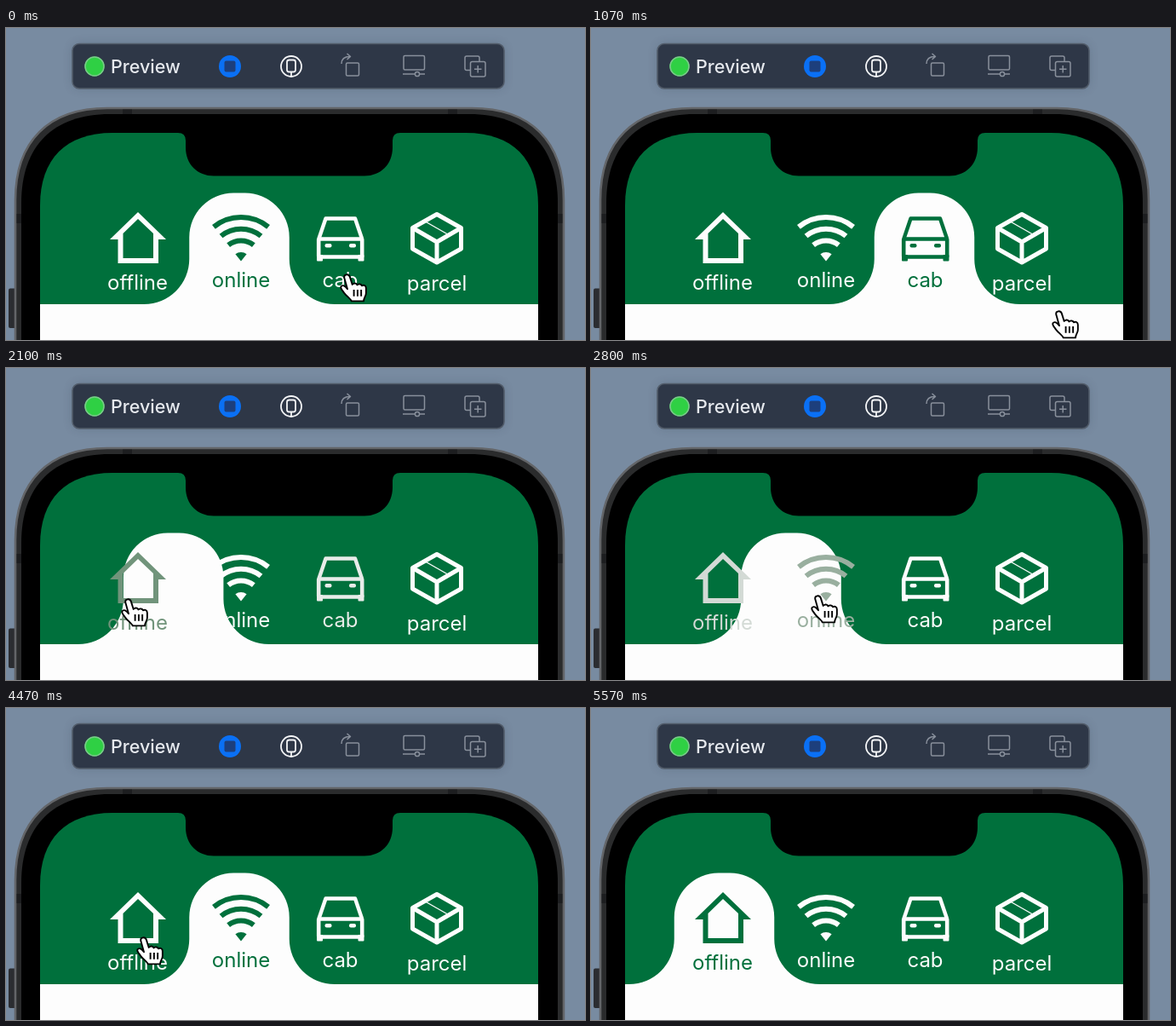
An HTML page with a canvas for the animation above (5.61 s loop, 680 px wide and 366 px high).

```html
<!DOCTYPE html>
<html lang="en">
<head>
<meta charset="utf-8">
<title>Tab bar preview</title>
<style>
html, body { margin: 0; width: 100%; height: 100%; overflow: hidden; background: #788ba1; }
canvas { display: block; width: 680px; height: 366px; }
</style>
</head>
<body>
<canvas id="stage"></canvas>
<script>
const LOOP = 5610, SLIDE = 350;
const GREEN = [0, 112, 60], WHITE = [253, 253, 253];
const FONT = 'Inter, Roboto, sans-serif';
const FIRST_X = 156.5, STEP = 117.5;

const canvas = document.getElementById('stage');
const ctx = canvas.getContext('2d');
const dpr = window.devicePixelRatio || 1;
canvas.width = 680 * dpr;
canvas.height = 366 * dpr;

const rgb = c => `rgb(${c.map(Math.round).join(',')})`;
const ease = x => x * x * (3 - 2 * x);
const clamp = x => Math.max(0, Math.min(1, x));

// Colours blend in linear light
function mix(a, b, k) {
  const g = 2.2;
  return a.map((v, i) => 255 * Math.pow(
    Math.pow(v / 255, g) * (1 - k) + Math.pow(b[i] / 255, g) * k, 1 / g));
}

function fill(path, color) {
  ctx.fillStyle = color;
  ctx.fill(path, 'evenodd');
}

function stroke(path, color, width) {
  ctx.strokeStyle = color;
  ctx.lineWidth = width;
  ctx.stroke(path);
}

function box(x, y, w, h, r) {
  const p = new Path2D();
  p.roundRect(x, y, w, h, r);
  return p;
}

function disc(x, y, r) {
  const p = new Path2D();
  p.arc(x, y, r, 0, 7);
  return p;
}

function text(str, x, y, size, color, align, weight = 400) {
  ctx.font = `${weight} ${size}px ${FONT}`;
  ctx.textAlign = align;
  ctx.fillStyle = color;
  ctx.fillText(str, x, y);
}

// Phone outline with smooth upper corners, open below the stage
function dome(x1, x2, y, e) {
  const k = e * 0.36;
  return new Path2D(`M${x1} 400V${y + e}C${x1} ${y + k} ${x1 + k} ${y} ${x1 + e} ${y}` +
    `H${x2 - e}C${x2 - k} ${y} ${x2} ${y + k} ${x2} ${y + e}V400Z`);
}

const screen = dome(40, 625, 123, 85);

function toolbar() {
  const gray = '#89909c', pale = '#f4f5f7';
  const bar = box(78, 18.5, 507, 52.5, 8);
  ctx.save();
  ctx.shadowColor = 'rgba(40,50,70,.2)';
  ctx.shadowBlur = 12 * dpr;
  fill(bar, '#2e3747');
  ctx.restore();
  stroke(bar, '#525c6a', 1.6);

  fill(disc(104, 45, 11.5), '#2fd044');
  stroke(disc(104, 45, 11), '#7ac98a', 1.5);
  text('Preview', 123, 53, 21.5, '#e6e9ee', 'left', 500);

  fill(disc(263, 45, 13), '#0a70f5');
  fill(box(256.5, 38.5, 13, 13, 2), '#1d3f7c');

  stroke(disc(335, 45, 12), pale, 1.8);
  stroke(box(330, 37.5, 10, 14, 2.5), pale, 1.8);
  stroke(new Path2D('M335 51.5V57'), pale, 1.8);

  stroke(box(399.5, 41, 15, 15, 1.5), gray, 1.5);
  stroke(new Path2D('M394 42C394 36 398 33.5 404 33.5M400.5 30L404.5 33.5L400.5 37'), gray, 1.5);

  stroke(box(467, 32.5, 24.5, 16.5, 1.5), gray, 1.5);
  stroke(new Path2D('M466 54H480M486 54H492'), gray, 1.5);
  stroke(disc(483, 54, 2.6), gray, 1.5);

  stroke(new Path2D('M545 49.5H541Q539 49.5 539 47.5V35Q539 33 541 33H554Q556 33 556 35V39'), gray, 1.5);
  stroke(box(545.5, 39.5, 17.5, 17.5, 2), gray, 1.5);
  stroke(new Path2D('M554.2 44V52.5M550 48.3H558.5'), gray, 1.5);
}

function phone() {
  fill(box(3, 305.5, 9, 46.5, 2), '#2b2d31');
  const shell = dome(11, 655, 94, 108);
  fill(shell, '#2a2b2c');
  stroke(shell, '#636568', 2.6);
  for (const x of [137, 519]) fill(box(x, 95.5, 11, 6, 0), '#1d1e20');
  for (const x of [12.5, 648]) fill(box(x, 218, 5.5, 11, 0), '#1d1e20');
  fill(dome(18, 648, 101, 104), '#000');
  fill(screen, rgb(GREEN));
  fill(new Path2D('M202 122H463V123Q454 123 454 132V140C454 160 440 173.5 421 173.5' +
    'H244C225 173.5 211 160 211 140V132Q211 123 202 123Z'), '#000');
}

function bump(cx) {
  const l = cx - STEP / 2, r = cx + STEP / 2, flare = 53, crown = 52;
  ctx.save();
  ctx.clip(screen);
  const p = new Path2D();
  p.moveTo(40, 370);
  p.lineTo(40, 324);
  p.arcTo(l, 324, l, 260, flare);
  p.arcTo(l, 193.5, cx, 193.5, crown);
  p.arcTo(r, 193.5, r, 260, crown);
  p.arcTo(r, 324, r + 80, 324, flare);
  p.lineTo(625, 324);
  p.lineTo(625, 370);
  fill(p, rgb(WHITE));
  ctx.restore();
}

function house(c) {
  fill(new Path2D('M155 216L188 248H179V276H131.5V248H122Z' +
    'M155 224L173 241V270H137.5V241Z'), c);
}

function wifi(c) {
  const half = 0.68, up = -Math.PI / 2;
  for (const r of [51, 37.3, 23.6]) {
    const p = new Path2D();
    p.arc(276, 273, r, up - half, up + half);
    stroke(p, c, 6);
  }
  const dot = new Path2D();
  dot.moveTo(276, 273.5);
  dot.arc(276, 273.5, 10.5, up - half, up + half);
  dot.closePath();
  fill(dot, c);
}

function car(c) {
  stroke(new Path2D('M367.5 247L375.5 223.5H410L418 247'), c, 4.4);
  stroke(box(367.2, 247.5, 51, 21, 1), c, 4.6);
  for (const x of [365, 413.5]) fill(box(x, 266, 7, 7.5, 1), c);
  for (const x of [374.5, 403]) fill(box(x, 253, 8, 4.5, 2), c);
}

function parcel(c) {
  stroke(new Path2D('M506 218.5L534.5 234.5V259L506 275L477.5 259V234.5Z' +
    'M477.5 234.5L506 251L534.5 234.5M506 251V275'), c, 5);
  stroke(new Path2D('M491.5 226.5L520.5 243'), c, 1.4);
}

const tabs = [
  { label: 'offline', x: 154.5, y: 307, icon: house },
  { label: 'online', x: 276, y: 304, icon: wifi },
  { label: 'cab', x: 392.5, y: 304, icon: car },
  { label: 'parcel', x: 506, y: 308, icon: parcel }
];

// Clicks: time and tab index
const clicks = [[150, 2], [1843, 0], [2586, 1], [4560, 0]];

function selection(t) {
  let from = 1, to = 1, p = 1;
  for (const [at, tab] of clicks) {
    if (t < at) break;
    from = to;
    to = tab;
    p = ease(clamp((t - at) / SLIDE));
  }
  return { from, to, p };
}

// Pointer stops: time, x, y
const stops = [
  [0, 401, 290], [260, 401, 290], [950, 550, 333], [1200, 550, 333],
  [1760, 144, 272], [2200, 144, 272], [2500, 267, 268], [2950, 267, 268],
  [3460, 391, 18], [3505, 391, 18], [4200, 162, 270], [4560, 162, 270], [4740, 152, 372]
];

const hand = new Path2D('M-4 3C-4.5-1.5 1.5-2 3 2L6 11.5C8 9.5 11 9.5 12 12' +
  'C14 10.5 17 10.5 18 13C20 11.5 23 12.5 23 16V22C23 26 20 28 20 32H5' +
  'C4 29-1 26-4 22C-6 19-9 16-8 14C-6 11.5-3 13 0 17Z');
const creases = new Path2D('M8 18V26M12.5 18V26M17 18V26');
const arrow = new Path2D('M0 0V28L6.5 22L11 33L16 31L11.5 20.5H20Z');

function pointer(t) {
  const i = stops.findIndex(s => s[0] > t);
  if (i < 0) return;
  const [t0, x0, y0] = stops[i - 1], [t1, x1, y1] = stops[i];
  const k = ease((t - t0) / (t1 - t0));
  const x = x0 + (x1 - x0) * k, y = y0 + (y1 - y0) * k;
  ctx.save();
  ctx.translate(x, y);
  if (y > 93) {
    ctx.scale(0.95, 0.95);
    fill(hand, '#fff');
    stroke(hand, '#000', 2);
    stroke(creases, '#000', 2);
  } else {
    stroke(arrow, '#fff', 3.5);
    fill(arrow, '#000');
  }
  ctx.restore();
}

function draw(t) {
  ctx.setTransform(dpr, 0, 0, dpr, 0, 0);
  ctx.lineJoin = 'round';
  ctx.fillStyle = '#788ba1';
  ctx.fillRect(0, 0, 680, 366);
  toolbar();
  phone();

  const { from, to, p } = selection(t);
  bump(FIRST_X + STEP * (from + (to - from) * p));
  tabs.forEach((tab, i) => {
    const on = i === to ? p : i === from ? 1 - p : 0;
    const color = rgb(mix(WHITE, GREEN, on));
    tab.icon(color);
    text(tab.label, tab.x, tab.y, 24, color, 'center');
  });
  pointer(t);
}

const start = performance.now();
function tick() {
  draw((performance.now() - start) % LOOP);
  requestAnimationFrame(tick);
}
tick();
</script>
</body>
</html>
```
